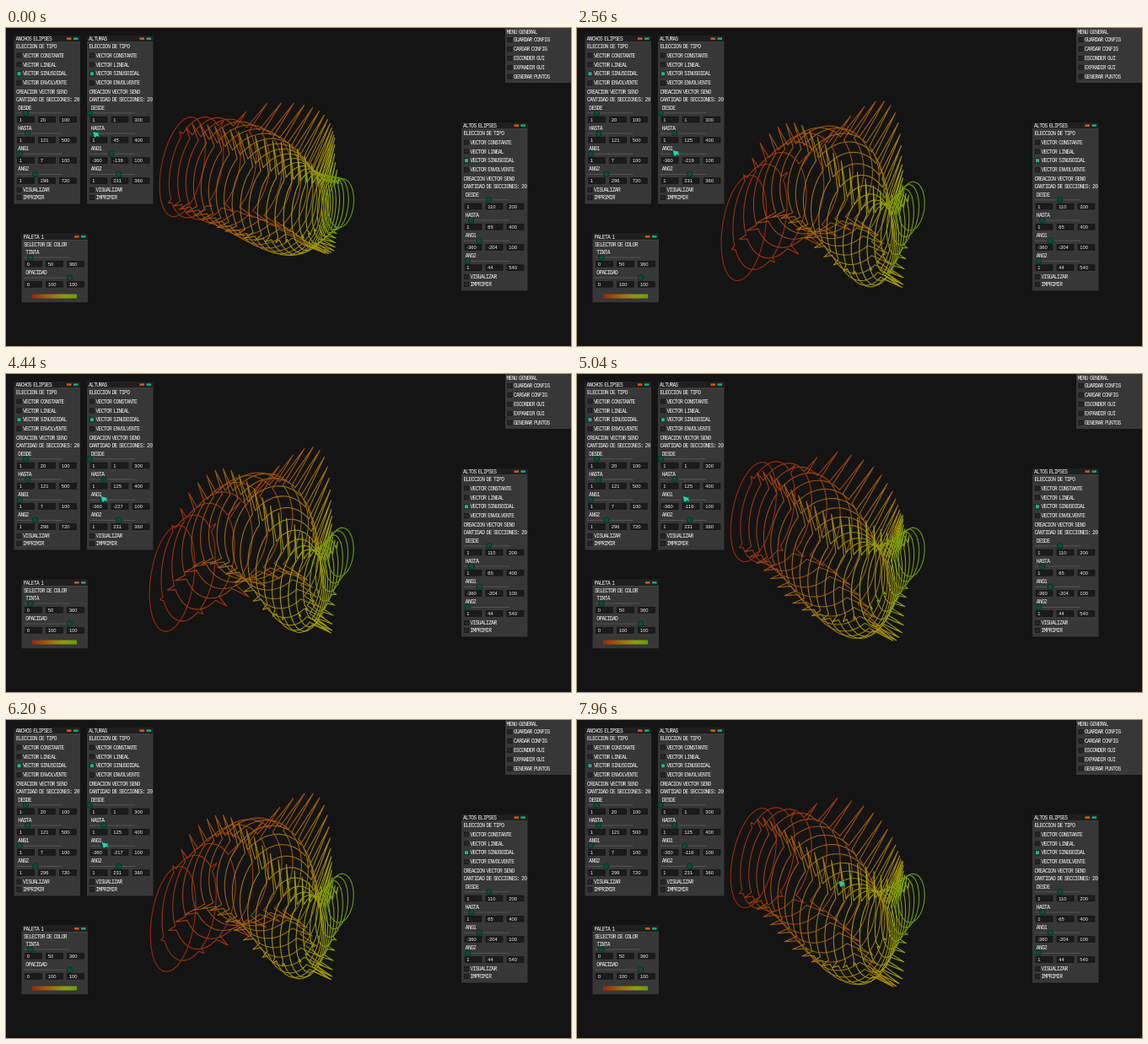
Recreate the animation shown at these times as an HTML page. Size 670 by 377 pixels, loop 8000 ms.

```html
<!DOCTYPE html>
<html lang="es">
<head>
<meta charset="utf-8">
<title>Generador de formas</title>
<style>
html, body { margin: 0; width: 100%; height: 100%; overflow: hidden; background: #141414; }
svg { display: block; width: 100vw; height: 100vh; }
text {
  font: 6.3px "Liberation Mono", monospace;
  letter-spacing: -.68px; word-spacing: -.9px; fill: #f0f0f0;
}
.number { font: 5.8px "Liberation Sans", sans-serif; letter-spacing: 0; }
.ring { fill: none; stroke-width: 1.1; stroke-linejoin: round; }
</style>
</head>
<body>
<svg viewBox="0 0 670 377">
  <defs><linearGradient id="hues"></linearGradient></defs>
  <g id="rings"></g>
  <g id="panels"></g>
  <path id="pointer" fill="#22d3a0" d="M-4-3 L4-1 L2 0 L4 3 L1 2 L-2 4 L-3 1Z"/>
</svg>
<script>
const NS = 'http://www.w3.org/2000/svg';
const LOOP = 8000, STEP = 40, SECTIONS = 24;
const byId = id => document.getElementById(id);
const panels = byId('panels');

// Control values shared by the panels and the shape.
const widths = { DESDE: 20, HASTA: 121, ANG1: 7, ANG2: 296 };
const offsets = { DESDE: 1, HASTA: 45, ANG1: -139, ANG2: 231 };
const heights = { DESDE: 110, HASTA: 65, ANG1: -204, ANG2: 44 };

function add(parent, tag, attrs, content = '') {
  const node = document.createElementNS(NS, tag);
  for (const key in attrs) node.setAttribute(key, attrs[key]);
  node.textContent = content;
  parent.appendChild(node);
  return node;
}
const rect = (x, y, width, height, fill, more) =>
  add(panels, 'rect', { x, y, width, height, fill, ...more });
const label = (x, middle, content, more) =>
  add(panels, 'text', { x, y: middle + 2.1, ...more }, content);
const hueAt = t => `hsl(${11 + 72 * t} 85% 33%)`;

// ---- control panels ----
function panel(x, y, height, title) {
  rect(x, y, 78.5, height, '#373737');
  rect(x, y, 78.5, 7.5, '#1f1f1f');
  rect(x, y + 7.5, 78.5, .7, '#484848');
  label(x + 2, y + 3.7, title, { 'font-weight': 'bold' });
  rect(x + 62.5, y + 2.3, 5.5, 2.6, '#cf5a12');
  rect(x + 70.5, y + 2.3, 5.5, 2.6, '#18a878');
}

function check(x, middle, content, on) {
  rect(x, middle - 2.5, 5, 5, on ? '#1fb585' : '#262626', { stroke: '#161616', 'stroke-width': .8 });
  label(x + 7, middle, content);
}

const knobX = (x, min, max, value) => {
  const low = Math.min(0, min);
  return x + 54 * (value - low) / (max - low);
};

function slider(x, middle, name, min, value, max) {
  label(x + 1.8, middle, name);
  rect(x, middle + 6, 54, .8, '#5a5a5a');
  const knob = add(panels, 'circle', { cy: middle + 6.4, r: 3.3, fill: '#0f4a3c', stroke: '#0b2f28' });
  const fields = [min, value, max].map((n, i) => {
    const left = x + 1 + 25 * i;
    rect(left, middle + 10.7, 20, 6.8, '#1b1b1b', { stroke: '#111', 'stroke-width': .6 });
    return label(left + 2.2, middle + 14, n, { class: 'number' });
  });
  const set = v => {
    knob.setAttribute('cx', knobX(x, min, max, v));
    fields[1].textContent = Math.round(v);
  };
  set(value);
  return set;
}

function vectorPanel(x, y, title, values, limits, minAngle = 1) {
  panel(x, y, 199.5, title);
  label(x + 2.5, y + 12.7, 'ELECCION DE TIPO');
  ['CONSTANTE', 'LINEAL', 'SINUSOIDAL', 'ENVOLVENTE'].forEach((kind, i) =>
    check(x + 3.5, y + 23.5 + 10.9 * i, 'VECTOR ' + kind, kind === 'SINUSOIDAL'));
  label(x + 2.5, y + 67, 'CREACION VECTOR SENO');
  label(x + 2.5, y + 75.5, 'CANTIDAD DE SECCIONES: 20');
  const setters = {};
  Object.keys(values).forEach((name, i) => {
    const min = name === 'ANG1' ? minAngle : 1;
    setters[name] = slider(x + 3, y + 85.4 + 24.2 * i, name, min, values[name], limits[i]);
  });
  check(x + 3.5, y + 183, 'VISUALIZAR');
  check(x + 3.5, y + 192, 'IMPRIMIR');
  return setters;
}

vectorPanel(9.5, 9, 'ANCHOS ELIPSES', widths, [100, 500, 100, 720]);
const setOffset = vectorPanel(96, 9, 'ALTURAS', offsets, [300, 400, 100, 360], -360);
vectorPanel(540, 112, 'ALTOS ELIPSES', heights, [200, 400, 100, 540], -360);

panel(18.5, 243.7, 81.5, 'PALETA 1');
label(21, 256.7, 'SELECTOR DE COLOR');
slider(21.5, 265.6, 'TINTA', 0, 50, 360);
slider(21.5, 289.7, 'OPACIDAD', 0, 100, 100);
for (let t = 0; t <= 1; t += .25) add(byId('hues'), 'stop', { offset: t, 'stop-color': hueAt(t) });
rect(31, 315.5, 53, 5, 'url(#hues)');

rect(592, 0, 78, 65, '#373737');
label(593.5, 5.3, 'MENU GENERAL');
['GUARDAR CONFIG', 'CARGAR CONFIG', 'ESCONDER GUI', 'EXPANDIR GUI', 'GENERAR PUNTOS'].forEach((name, i) =>
  check(595, 14 + 10.9 * i, name));

// ---- spiked rings in perspective ----
const FOCAL = 326, LENGTH = 500;
const ORIGIN = [-164, -40, 421];
const AXIS = [.631, .163, .759], DOWN = [-.103, .973, -.124], SIDE = [.769, 0, -.639];
const radians = deg => deg * Math.PI / 180;
const mix = (a, b, u) => a + (b - a) * u;

const wave = (v, t) =>
  mix(v.DESDE, v.HASTA, (1 + Math.sin(radians(mix(v.ANG1, v.ANG2, t)))) / 2);

function project(along, side, down) {
  const [x, y, z] = ORIGIN.map((o, i) => o + AXIS[i] * along + SIDE[i] * side + DOWN[i] * down);
  return `${(335 + FOCAL * x / z).toFixed(1)} ${(188 + FOCAL * y / z).toFixed(1)}`;
}

// An ellipse whose four diagonal points are pulled out to thin spikes.
function ringPath(t) {
  const w = wave(widths, t) + 31 * t - 14;
  const h = wave(heights, t);
  const drop = wave(offsets, t);
  const spike = Math.max(0, Math.min(1, t / .12, (.92 - t) / .25));
  const points = [];
  for (let deg = 0; deg < 360; deg += 3) {
    const c = Math.cos(radians(deg)), s = Math.sin(radians(deg));
    let side = w * c, down = h * s;
    if (deg % 90 === 45) {
      const lean = s > 0 ? 90 * Math.max(0, t - .4) : 0;
      const reach = s > 0 ? .82 : .95 + 1.15 * t;
      side = mix(side, Math.sign(c) * 1.08 * w + lean, spike);
      down = mix(down, Math.sign(s) * reach * h, spike);
    }
    points.push(project(LENGTH * t, side, drop + down));
  }
  return `M${points.join('L')}Z`;
}

const rings = Array.from({ length: SECTIONS }, (_, i) => {
  const t = i / (SECTIONS - 1);
  return { t, node: add(byId('rings'), 'path', { class: 'ring', stroke: hueAt(t) }) };
});

// ---- motion ----
function track(keys, time) {
  const next = keys.findIndex(([at]) => at >= time);
  if (next <= 0) return keys.at(next).slice(1);
  const [t0, ...from] = keys[next - 1], [t1, ...to] = keys[next];
  return from.map((v, i) => mix(v, to[i], (time - t0) / (t1 - t0)));
}

const TOP = [[0, 45], [440, 165], [620, 165], [1000, 125]];
const ANGLE = [[2140, -139], [2900, -283], [3640, -360], [4020, -360], [4440, -227],
  [5040, -116], [5680, 20], [6200, -217], [6460, -217], [7360, -116]];
const REACH = [[1000, 118, 126], [1160, 131, 156], [2140, 127, 148]];
const LEAVE = [[7760, 130, 147], [7960, 314.5, 194]];

function pointerAt(time) {
  if (time < 1000) return [knobX(99, 1, 400, offsets.HASTA) + 2, 126];
  if (time < 2140) return track(REACH, time);
  if (time < 7480) return [knobX(99, -360, 100, offsets.ANG1) + 2, 148];
  return track(LEAVE, time);
}

let shown = -1;
function draw(now) {
  const time = Math.floor(now % LOOP / STEP) * STEP;
  if (time === shown) return;
  shown = time;
  [offsets.HASTA] = track(TOP, time);
  [offsets.ANG1] = track(ANGLE, time);
  for (const name of ['HASTA', 'ANG1']) setOffset[name](offsets[name]);
  for (const { t, node } of rings) node.setAttribute('d', ringPath(t));
  byId('pointer').setAttribute('transform', `translate(${pointerAt(time)})`);
}

const start = performance.now();
function tick() {
  draw(performance.now() - start);
  requestAnimationFrame(tick);
}
tick();
</script>
</body>
</html>
```
